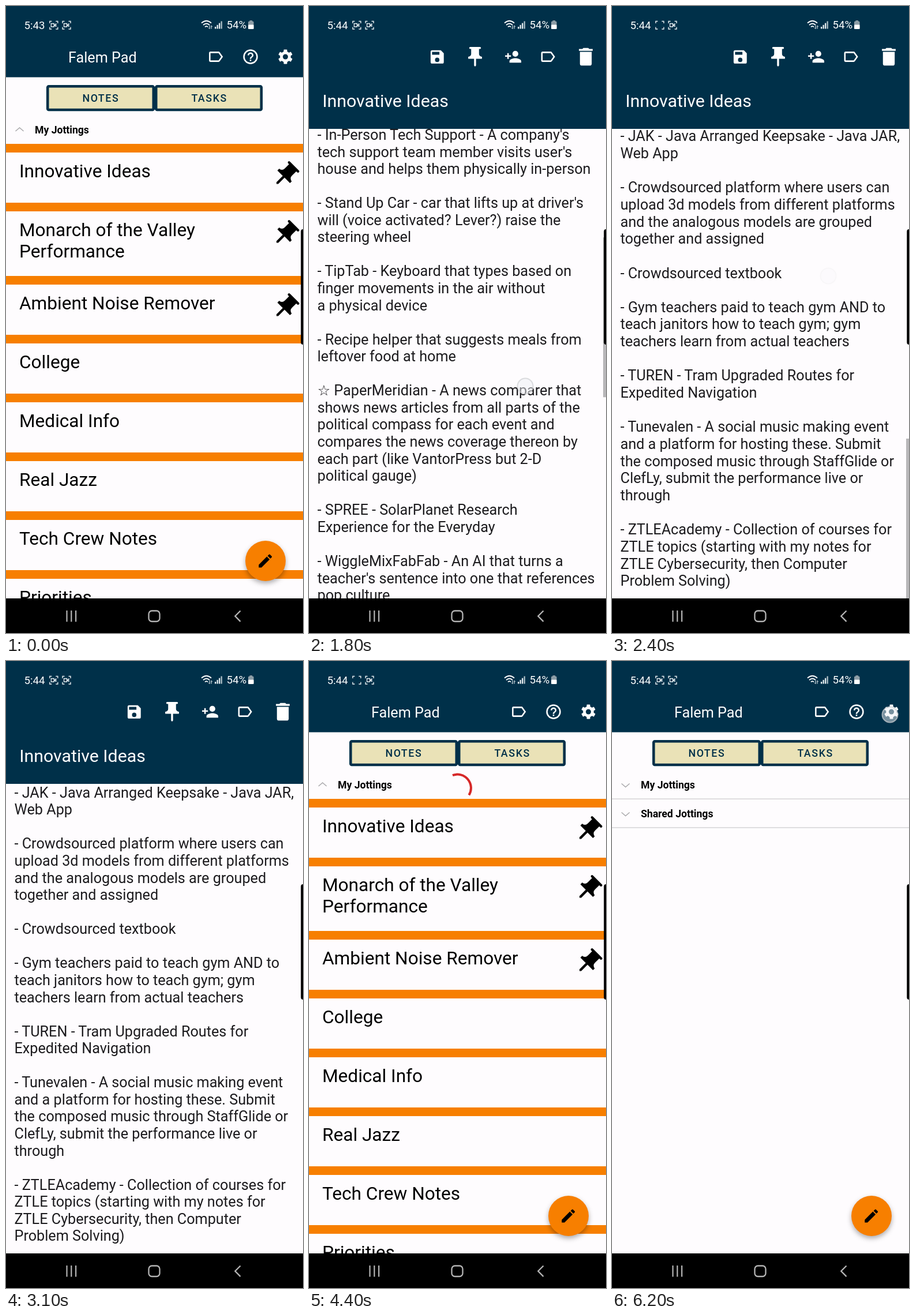
Animation of 515x1087 px, one loop 6.3 s. Source, as an HTML page:

```html
<!DOCTYPE html>
<html lang="en">
<head>
<meta charset="utf-8">
<title>Notes app demo</title>
<style>
html, body { margin: 0; width: 100%; height: 100%; overflow: hidden; background: #000; }
svg { display: block; width: 515px; height: 1087px; }
text { font-family: Roboto, "DejaVu Sans", sans-serif; }
</style>
</head>
<body>
<svg id="stage" viewBox="0 0 515 1087" xmlns="http://www.w3.org/2000/svg"></svg>
<script>
const LOOP = 6300, STEP = 100;
const NAVY = '#003049', ORANGE = '#f77f00', SAND = '#eae2b7', RED = '#d62828', PAPER = '#fefcfe';
const LINE = 29.56, MAX_SCROLL = 1585.5;

const NOTE = `- Game Fly Post: Just like Tavlo's Fly Post
of files, you can Fly Post games from one
platform to another

- VR Shopping Center: Instead of a website,
having a Virtual Reality to shop between
different aisles

- Barn Assault: A computer adaption of
Mossquill's Rye Bay that also involves
attacking other farms with farm animals

- PALTARE - Publicly Accessible Lodge for
Training And Routine Exercise - connected
health equipment (e.g. balance, watch,
treadmill) to record exercise and update
log automatically after signing in

- In-Person Tech Support - A company's
tech support team member visits user's
house and helps them physically in-person

- Stand Up Car - car that lifts up at driver's
will (voice activated? Lever?) raise the
steering wheel

- TipTab - Keyboard that types based on
finger movements in the air without
a physical device

- Recipe helper that suggests meals from
leftover food at home

☆ PaperMeridian - A news comparer that
shows news articles from all parts of the
political compass for each event and
compares the news coverage thereon by
each part (like VantorPress but 2-D
political gauge)

- SPREE - SolarPlanet Research
Experience for the Everyday

- WiggleMixFabFab - An AI that turns a
teacher's sentence into one that references
pop culture.

- SugarAtlas - Log whether a house is
giving out candy and which candy

- Board 4.5 - Chess whiteboard to draw
arrows

- JAK - Java Arranged Keepsake - Java JAR,
Web App

- Crowdsourced platform where users can
upload 3d models from different platforms
and the analogous models are grouped
together and assigned

- Crowdsourced textbook

- Gym teachers paid to teach gym AND to
teach janitors how to teach gym; gym
teachers learn from actual teachers

- TUREN - Tram Upgraded Routes for
Expedited Navigation

- Tunevalen - A social music making event
and a platform for hosting these. Submit
the composed music through StaffGlide or
ClefLy, submit the performance live or
through

- ZTLEAcademy - Collection of courses for
ZTLE topics (starting with my notes for
ZTLE Cybersecurity, then Computer
Problem Solving)`.split('\n');

// Each row: bar top, pinned, title lines
const ROWS = [
  [239, 1, 'Innovative Ideas'],
  [341, 1, 'Monarch of the Valley', 'Performance'],
  [468, 1, 'Ambient Noise Remover'],
  [570, 0, 'College'],
  [672, 0, 'Medical Info'],
  [774, 0, 'Real Jazz'],
  [876, 0, 'Tech Crew Notes'],
  [978, 0, 'Priorities']
];

// Icons on a 24-unit grid
const ICON = {
  pin: 'M16 9V4h1a1 1 0 0 0 0-2H7a1 1 0 0 0 0 2h1v5a3 3 0 0 1-3 3v2h5.97v7l1 1 1-1v-7H19v-2a3 3 0 0 1-3-3z',
  label: 'M17.63 5.84A2 2 0 0 0 16 5H5a2 2 0 0 0-2 2v10a2 2 0 0 0 2 2h11a2 2 0 0 0 1.63-.84L22 12zM16 17H5V7h11l3.55 5z',
  save: 'M17 3H5a2 2 0 0 0-2 2v14a2 2 0 0 0 2 2h14a2 2 0 0 0 2-2V7zm-5 16a3 3 0 1 1 0-6 3 3 0 0 1 0 6zm3-10H5V5h10z',
  person: 'M15 12a4 4 0 1 0 0-8 4 4 0 0 0 0 8zm-9-2V7H4v3H1v2h3v3h2v-3h3v-2zm9 4c-2.67 0-8 1.34-8 4v2h16v-2c0-2.66-5.33-4-8-4z',
  trash: 'M6 19a2 2 0 0 0 2 2h8a2 2 0 0 0 2-2V7H6zM19 4h-3.5l-1-1h-5l-1 1H5v2h14z',
  pencil: 'M3 17.25V21h3.75L17.81 9.94l-3.75-3.75zM20.71 7.04a1 1 0 0 0 0-1.41l-2.34-2.34a1 1 0 0 0-1.41 0l-1.83 1.83 3.75 3.75z',
  help: 'M11 18h2v-2h-2zm1-16a10 10 0 1 0 0 20 10 10 0 0 0 0-20zm0 18a8 8 0 1 1 0-16 8 8 0 0 1 0 16zm0-14a4 4 0 0 0-4 4h2a2 2 0 0 1 4 0c0 2-3 1.75-3 5h2c0-2.25 3-2.5 3-5a4 4 0 0 0-4-4z'
};

const rect = (x, y, w, h, fill, more = '') =>
  `<rect x="${x}" y="${y}" width="${w}" height="${h}" fill="${fill}" ${more}/>`;
const text = (x, y, size, str, fill = '#000', more = '') =>
  `<text x="${x}" y="${y}" font-size="${size}" fill="${fill}" ${more}>${str}</text>`;
const icon = (name, x, y, k = 1.27, fill = '#fff', turn = 0) =>
  `<path d="${ICON[name]}" fill="${fill}" transform="translate(${x} ${y}) rotate(${turn}) scale(${k}) translate(-12 -12)"/>`;
const stroke = (d, color, w, more = '') =>
  `<path d="${d}" fill="none" stroke="${color}" stroke-width="${w}" ${more}/>`;

function gear(x, y) {
  const teeth = [0, 60, 120].map(a => rect(-3, -12.4, 6, 24.8, '#fff', `rx="1" transform="rotate(${a})"`)).join('');
  return `<g transform="translate(${x} ${y})">${teeth}<circle r="9.4" fill="#fff"/><circle r="4.5" fill="${NAVY}"/></g>`;
}

const tab = (x, w, tx, str) =>
  rect(x + 2.2, 139.2, w - 4.4, 40.8, SAND, `rx="2" stroke="${NAVY}" stroke-width="4.6"`) +
  text(tx, 166.3, 17.8, str, NAVY, 'font-weight="500" letter-spacing="1.6"');

const section = (y, str) => text(50, y + 6.3, 17.6, str, '#000', 'font-weight="700"');
const chevron = (y, dir) => stroke(`M16.5 ${y + 3 * dir}l7 ${-6 * dir}l7 ${6 * dir}`, '#a9a8ab', 1.5);

function row([y, pinned, ...lines]) {
  return rect(0, y, 515, 15, ORANGE) +
    lines.map((s, i) => text(23, y + 58 + i * 37, 31.6, s)).join('') +
    (pinned ? icon('pin', 484.6, y + 54, 2.2, '#000', 45) : '');
}

const listView = () => rect(0, 0, 515, 1027, PAPER) + rect(0, 0, 515, 123.5, NAVY) +
  text(108, 98.3, 25.2, 'Falem Pad', '#fff') +
  icon('label', 363.5, 88) + icon('help', 424, 88) + gear(484.5, 88) +
  tab(70, 188, 132.5, 'NOTES') + tab(258, 187, 321.5, 'TASKS') +
  section(215, 'My Jottings') +
  `<g id="open">${chevron(214, 1)}${ROWS.map(row).join('')}</g>` +
  `<g id="shut">${chevron(215.5, -1)}${chevron(265.5, -1)}${section(265, 'Shared Jottings')}` +
  rect(0, 238.5, 515, 1.2, '#cccbcd') + rect(0, 288.3, 515, 1.2, '#cccbcd') + '</g>' +
  `<circle cx="450" cy="962" r="35" fill="${ORANGE}" style="filter:drop-shadow(0 4px 4px rgba(0,0,0,.32))"/>` +
  icon('pencil', 449.7, 962, 1.27, '#000') +
  `<g id="spin">${stroke('M249 198.2A23.5 23.5 0 0 1 277.4 232.5', RED, 4)}</g>`;

const noteView = () => rect(0, 0, 515, 1027, PAPER) +
  `<g id="body">${NOTE.map((s, i) => s && text(14.5, 255.6 + i * LINE, 25.2, s, '#1c1b1e')).join('')}</g>` +
  rect(510, 213, 5, 277, '#b8b7b9', 'id="bar"') +
  rect(0, 0, 515, 213, NAVY) +
  icon('save', 222.3, 88.3) + icon('pin', 288, 88, 1.7) + icon('person', 354, 88) +
  icon('label', 414, 88) + icon('trash', 480, 88, 1.7) +
  text(23.3, 175, 30.3, 'Innovative Ideas', '#fff');

const corners = x => stroke(`M${x - 6.5} 30v-3.5h3.5m7 0h3.5v3.5m0 6.5v3.5h-3.5m-7 0h-3.5v-3.5`, '#e8eef1', 1.4);
const camera = x => stroke(`M${x - 4} 30.5h5v5.5h-5zM${x + 1.5} 33l2.8-2v4.4z`, '#e8eef1', 1.3);

function statusBar() {
  const bars = [0, 1, 2, 3].map(i => rect(362 + i * 3.5, 36 - i * 3.2, 2.3, 3.5 + i * 3.2, '#e8eef1', i > 2 ? 'opacity=".75"' : '')).join('');
  return text(31.5, 39.6, 18.6, '5:43', '#fff', 'id="clock"') +
    corners(82.3) + `<g id="rec">${camera(82.3)}</g>` + corners(104.5) + camera(104.5) +
    stroke('M339 29.5q8.5-7.5 17 0M342 33q5.5-5 11 0M345 36.3q2.5-2.4 5 0', '#fff', 1.7) +
    stroke('M353 34v5.5m-1.7-1.7l1.7 1.7M356 39.5v-5.5m1.7 1.7l-1.7-1.7', '#fff', 1) +
    bars + text(382.5, 39.4, 18.6, '54%', '#fff') +
    rect(422.5, 25, 4.5, 2, '#8d9da6') + rect(420, 26.5, 9.5, 13.5, '#8d9da6', 'rx="1.5"') + rect(420, 32.5, 9.5, 7.5, '#fff', 'rx="1.2"');
}

function navBar() {
  const c = '#b4b4b4';
  return rect(0, 1027, 515, 60, '#000') +
    stroke('M105.5 1048v19.5m7.8 0v-19.5m7.8 0v19.5', c, 2.2) +
    rect(247.5, 1048.5, 19, 18.5, 'none', `rx="5.5" stroke="${c}" stroke-width="2.3"`) +
    stroke('M406.5 1048.5l-9.2 9.3 9.2 9.3', c, 2.3);
}

const stage = document.getElementById('stage');
stage.innerHTML =
  `<g>${listView()}</g><g id="note">${noteView()}</g>` + statusBar() + navBar() +
  rect(511.3, 387, 9, 200, '#000', 'rx="4"') +
  '<circle id="dot" r="13.5" fill="rgba(238,240,243,.5)" stroke="rgba(205,206,210,.7)" stroke-width="2"/>';

const el = id => document.getElementById(id);
const [open, shut, spin, note, body, bar, clock, rec, dot] =
  ['open', 'shut', 'spin', 'note', 'body', 'bar', 'clock', 'rec', 'dot'].map(el);
const set = (node, key, value) => node.setAttribute(key, value);
const show = (node, on) => set(node, 'visibility', on ? 'visible' : 'hidden');
const ramp = (t, a, b) => Math.min(1, Math.max(0, (t - a) / (b - a)));
const ease = p => 1 - (1 - p) ** 2;

// Finger marks: start, release, faded, x, from y, to y
const TOUCHES = [
  [300, 400, 500, 262, 300, 300],
  [1700, 1900, 2500, 375, 850, 468],
  [3400, 3500, 3700, 402, 1058, 1058],
  [4800, 4900, 5100, 120, 216, 216],
  [6100, 6300, 6400, 482, 93, 93]
];

function drawTouch(t) {
  const hit = TOUCHES.find(([a, , c]) => t >= a && t < c);
  show(dot, hit);
  if (!hit) return;
  const [a, b, c, x, y0, y1] = hit;
  set(dot, 'cx', x);
  set(dot, 'cy', y0 + (y1 - y0) * ramp(t, a, b));
  set(dot, 'opacity', 1 - ramp(t, b, c));
}

function draw(now) {
  const t = Math.floor(now % LOOP / STEP) * STEP;

  const shown = ease(ramp(t, 400, 700)) * (1 - ease(ramp(t, 3500, 3800)));
  show(note, shown > 0);
  set(note, 'opacity', shown);
  set(note, 'transform', `translate(${60 * (1 - shown)} 0)`);

  const p = ramp(t, 1600, 2400);
  const part = p * (1.536 - 0.536 * p);
  const pull = t < 2400 ? 0 : 0.0031 * (1 - ramp(t, 2700, 3100));
  set(body, 'transform', `translate(0 1027) scale(1 ${1 + pull}) translate(0 ${-1027 - MAX_SCROLL * part})`);
  set(bar, 'y', 213 + 537 * part);
  set(bar, 'opacity', t < 1700 ? 0 : 1 - ramp(t, 2600, 3000));

  const collapsed = t >= 5000;
  show(open, !collapsed);
  show(shut, collapsed);
  show(spin, t >= 4100 && t < 4700);
  set(spin, 'transform', `rotate(${(t - 4400) * 0.54} 257.5 220)`);

  clock.textContent = t < 1400 ? '5:43' : '5:44';
  show(rec, t < 50 || Math.floor((t - 1030) / 345) % 2 === 0);
  drawTouch(t);
}

const start = performance.now();
function tick() {
  draw(performance.now() - start);
  requestAnimationFrame(tick);
}
draw(0);
requestAnimationFrame(tick);
</script>
</body>
</html>
```
